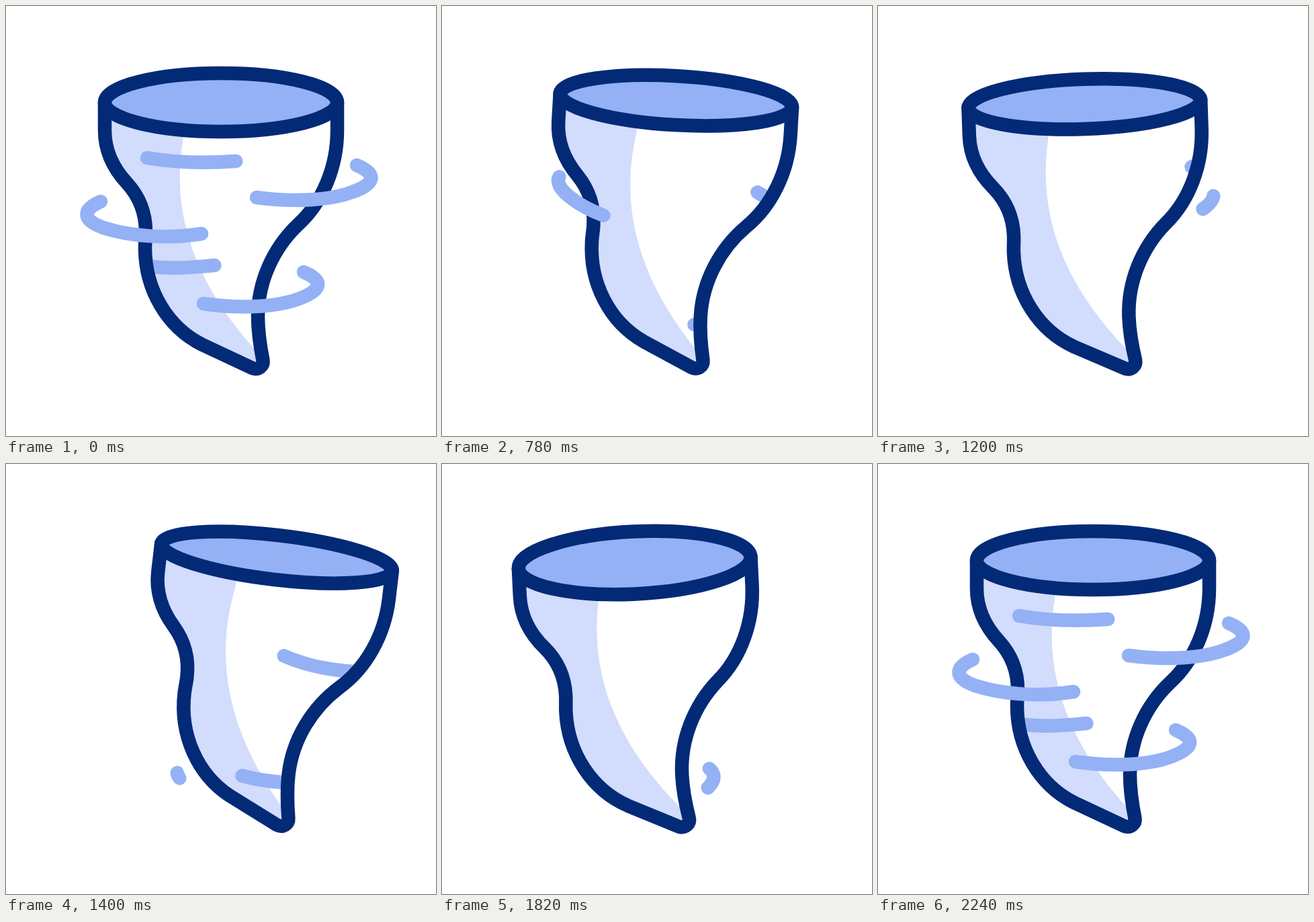
Recreate the animation shown at these times as an HTML page with a canvas. Size 640 by 640 pixels, loop 2.86 s.

```html
<!DOCTYPE html>
<html lang="en">
<head>
<meta charset="utf-8">
<title>Tornado</title>
<style>
  html, body { margin: 0; width: 100%; height: 100%; overflow: hidden; background: #fff; }
  canvas { display: block; }
</style>
</head>
<body>
<canvas id="stage" width="640" height="640"></canvas>
<script>
const ctx = document.getElementById('stage').getContext('2d');
const LOOP = 2860, START = 220, END = 2240;
const NAVY = '#032a76', BLUE = '#93b1f4', PALE = '#d2dcfd';
const PIVOT = { x: 381, y: 540 };

const clamp = v => Math.min(1, Math.max(0, v));
const ramp = (t, a, b) => clamp((t - a) / (b - a));
const smooth = p => p * p * (3 - 2 * p);

// Eased value between [time, value] keys
function track(keys, t) {
  if (t <= keys[0][0]) return keys[0][1];
  for (let i = 1; i < keys.length; i++) {
    const [a, u] = keys[i - 1], [b, v] = keys[i];
    if (t < b) return u + (v - u) * smooth((t - a) / (b - a));
  }
  return keys[keys.length - 1][1];
}

const SHIFT = [[220, 0], [610, 39], [983, -38], [1405, 36.5], [1812, -14], [2240, 0]];
const TILT = [[220, 0], [640, 6.3], [1070, -5.5], [1450, 7.25], [1870, -3.2], [2240, 0]];
const RIM = [[220, 43.5], [650, 31.2], [980, 46.5], [1340, 32.5], [1830, 46.5], [2240, 43.5]];

const body = new Path2D(`M147 143V185C147 216 160 242 180 263.5C200 285.5 208 311 208 336
  C208 345 207 352 207 360C207 422 240 478 292 504L366.7 539Q373 541.5 378.5 537.5
  Q383.5 533.5 382.4 527C378 505 375 485 375 462C375 410 398 360 435 325
  C471 292 493 240 493 185V143`);
const shade = new Path2D('M100 143H266L264 195C247 290 267 400 376 517V560H100Z');

function curve(d) {
  const el = document.createElementNS('http://www.w3.org/2000/svg', 'path');
  el.setAttribute('d', d);
  return { path: new Path2D(d), length: el.getTotalLength() };
}

// Lines seen at rest: they leave by their far end and grow back at the close.
// rest = share of the path drawn at rest, leave = time taken to run off
function resting(d, rest, leave, inside = false) {
  const span = t => {
    if (t <= START) return [0, rest];
    if (t < START + leave) {
      const p = (t - START) / leave;
      return [p * p, rest + (1 - rest) * clamp(p * 1.8)];
    }
    return [0, rest * smooth(ramp(t, 1900, END))];
  };
  return { ...curve(d), span, inside };
}

// Lines that sweep past once: head and tail each run along the path
function passing(d, head, tail, inside = false) {
  const span = t => [ramp(t, ...tail), ramp(t, ...head)];
  return { ...curve(d), span, inside };
}

const LOW = 'M215 445C240 462 280 469 305 472C325 475 345 476 366 475L410 470';
const lines = [
  resting('M373 285C425 292 480 290 515 277C550 265 553 250 522 237', 1, 550),
  resting('M141 291C113 303 113 319 145 330C185 343 240 347 291 339', 1, 550),
  resting('M294 443C340 450 400 450 438 435C472 422 472 408 443 396', 1, 550),
  resting('M210 226C250 233 300 234 343 231C400 230 450 220 490 210', 0.47, 333, true),
  resting('M190 383C235 394 275 389 311 386C335 393 370 391 415 384', 0.535, 333, true),
  passing('M180 278C190 285 200 290 213 293C280 308 380 305 510 280', [440, 640], [500, 720], true),
  passing('M180 230C270 225 380 240 445 271C460 279 480 288 510 300', [560, 740], [600, 825], true),
  passing(LOW, [560, 740], [600, 832], true),
  passing('M165 215C260 262 400 262 482 241L510 232', [900, 1100], [980, 1226], true),
  passing('M180 230C240 262 300 276 345 287C385 299 420 303 500 296', [1210, 1385], [1268, 1516], true),
  passing(LOW, [1210, 1385], [1290, 1521], true),
  passing('M153 267C144 284 185 310 227 322C310 345 420 345 489 307C500 300 506 294 507 287',
    [700, 1040], [860, 1225]),
  passing('M210 479C219 513 360 520 413 483C424 473 425 463 416 455', [1392, 1640], [1520, 1868])
];

function drawLines(t, inside) {
  ctx.strokeStyle = BLUE;
  for (const line of lines) {
    if (line.inside !== inside) continue;
    const [from, to] = line.span(t);
    if (to - from < 0.002) continue;
    ctx.setLineDash([(to - from) * line.length, line.length * 2]);
    ctx.lineDashOffset = -from * line.length;
    ctx.stroke(line.path);
  }
  ctx.setLineDash([]);
}

function draw(t) {
  ctx.fillStyle = '#fff';
  ctx.fillRect(0, 0, 640, 640);
  ctx.save();
  ctx.translate(PIVOT.x + track(SHIFT, t), PIVOT.y);
  ctx.rotate(track(TILT, t) * Math.PI / 180);
  ctx.translate(-PIVOT.x, -PIVOT.y);
  ctx.lineWidth = 20.5;
  ctx.lineCap = ctx.lineJoin = 'round';

  ctx.save();
  ctx.clip(body);
  ctx.fillStyle = PALE;
  ctx.fill(shade);
  drawLines(t, true);
  ctx.restore();

  ctx.strokeStyle = NAVY;
  ctx.stroke(body);
  ctx.beginPath();
  ctx.ellipse(320, 143.5, 173, track(RIM, t), 0, 0, Math.PI * 2);
  ctx.fillStyle = BLUE;
  ctx.fill();
  ctx.stroke();

  drawLines(t, false);
  ctx.restore();
}

const t0 = performance.now();
function tick() {
  draw((performance.now() - t0) % LOOP);
  requestAnimationFrame(tick);
}
tick();
</script>
</body>
</html>
```
